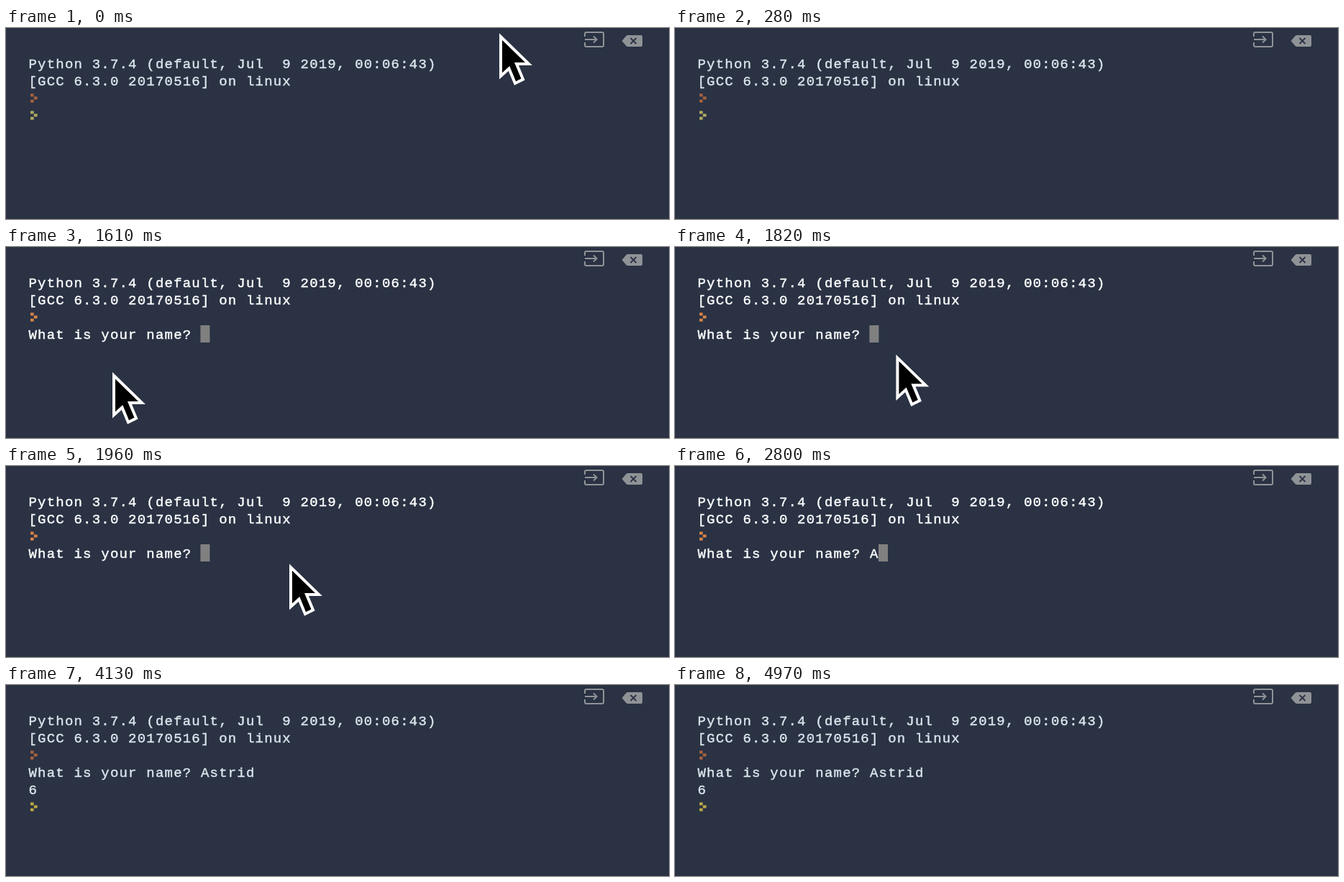
Recreate the animation shown at these times as an HTML page. Size 922 by 266 pixels, loop 5180 ms.

```html
<!DOCTYPE html>
<html lang="en">
<head>
<meta charset="utf-8">
<title>Console session</title>
<style>
  html, body { margin: 0; width: 100%; height: 100%; overflow: hidden; background: #2a3244; }
  svg { display: block; width: 922px; height: 266px; }
  text {
    font: 19px "Courier New", "Liberation Mono", monospace;
    letter-spacing: 1.2px;
    white-space: pre;
    stroke-width: 0.45px;
  }
</style>
</head>
<body>
<svg viewBox="0 0 922 266">
  <defs>
    <path id="chevron" d="M34 -12.5h4.6v4h-4.6z M38.8 -8.4h4.8v4h-4.8z M34 -4.2h4.6v4h-4.6z"/>
  </defs>
  <rect width="922" height="266" fill="#2a3244"/>

  <g fill="none" stroke="#909396" stroke-width="2">
    <path d="M805 12V8Q805 6 807 6H829Q831 6 831 8V24Q831 26 829 26H807Q805 26 805 24V20"/>
    <path d="M805 16H821M817 11.5L821.5 16L817 20.5"/>
  </g>
  <path d="M856.5 18L862.5 11Q863.5 10 865 10H883Q885 10 885 12V24Q885 26 883 26H865Q863.5 26 862.5 25Z" fill="#909396"/>
  <path d="M868.5 14L876.5 22M876.5 14L868.5 22" stroke="#2a3244" stroke-width="1.8"/>

  <g id="output">
    <text x="31.5" y="56">Python 3.7.4 (default, Jul  9 2019, 00:06:43)</text>
    <text x="31.5" y="80">[GCC 6.3.0 20170516] on linux</text>
    <text id="question" x="31.5" y="128"></text>
    <text id="answer" x="31.5" y="152">6</text>
  </g>
  <use id="oldPrompt" href="#chevron" y="104"/>
  <use id="prompt" href="#chevron"/>
  <rect id="block" width="13" height="24" fill="#808080"/>
  <path id="mouse" d="M2 5V60L13.5 49.5L22 70L33 64.5L24 43H41Z" fill="#000" stroke="#fff" stroke-width="4"/>
</svg>
<script>
const LOOP = 5180, STEP = 70;
const COL = 12.6, LEFT = 31, LINE = 24, TOP = 37;
const QUESTION = "What is your name? ";
const NAME = "Astrid";
const KEY_TIMES = [2660, 2870, 2940, 3080, 3150, 3220];
const RUN = 1050, ASK = 1260, ENTER = 3710, REPLY = 3780, DONE = 3850;

const el = Object.fromEntries(
  ["output", "question", "answer", "oldPrompt", "prompt", "block", "mouse"]
    .map(id => [id, document.getElementById(id)]));

const clamp = v => Math.max(0, Math.min(1, v));
const mix = (a, b, k) => a + (b - a) * k;
const mixColor = (a, b, k) => `rgb(${a.map((v, i) => Math.round(mix(v, b[i], k)))})`;
const show = (node, on) => node.setAttribute("visibility", on ? "visible" : "hidden");

// Text is bright while the program runs and dim while the prompt waits.
function brightness(t) {
  return t < RUN ? 0 : 1 - clamp((t - DONE) / 210);
}

function mousePose(t) {
  if (t < STEP) return [686, 7];
  if (t < 1330 || t >= KEY_TIMES[0]) return null;
  if (t < 1610) {
    const k = (t - 1330) / 280;
    return [mix(90, 148, k), mix(-80, 174, k)];
  }
  const k = clamp((t - 1610) / 350);
  const e = k * k * (3 - 2 * k);
  return [mix(148, 394, e), mix(174, 136, e)];
}

// Column and line of the text cursor, or null when it is hidden.
function blockCell(t, typed) {
  if (t < RUN || t >= 4060) return null;
  if (t < ASK) return [1, 3];
  if (t < ENTER) return [QUESTION.length + typed, 3];
  return t < REPLY ? [0, 4] : [2, 5];
}

function draw(time) {
  const t = Math.floor(time % LOOP / STEP) * STEP;
  const lit = brightness(t);
  const ink = mixColor([219, 229, 236], [253, 254, 254], lit);
  el.output.setAttribute("fill", ink);
  el.output.setAttribute("stroke", ink);
  el.oldPrompt.setAttribute("fill", mixColor([166, 98, 62], [216, 132, 70], lit));

  const typed = KEY_TIMES.filter(k => t >= k).length;
  el.question.textContent = t < ASK ? "" : QUESTION + NAME.slice(0, typed);

  const ended = t >= REPLY;
  show(el.answer, ended);
  show(el.prompt, t < RUN || ended);
  el.prompt.setAttribute("y", ended ? 176 : 128);
  el.prompt.setAttribute("fill", ended ? "#bba945" : "#b1aa62");

  const cell = blockCell(t, typed);
  show(el.block, cell);
  if (cell) {
    el.block.setAttribute("x", LEFT + cell[0] * COL);
    el.block.setAttribute("y", TOP + cell[1] * LINE);
  }

  const pose = mousePose(t);
  show(el.mouse, pose);
  if (pose) el.mouse.setAttribute("transform", `translate(${pose})`);
}

const start = performance.now();
function tick() {
  draw(performance.now() - start);
  requestAnimationFrame(tick);
}
tick();
</script>
</body>
</html>
```
